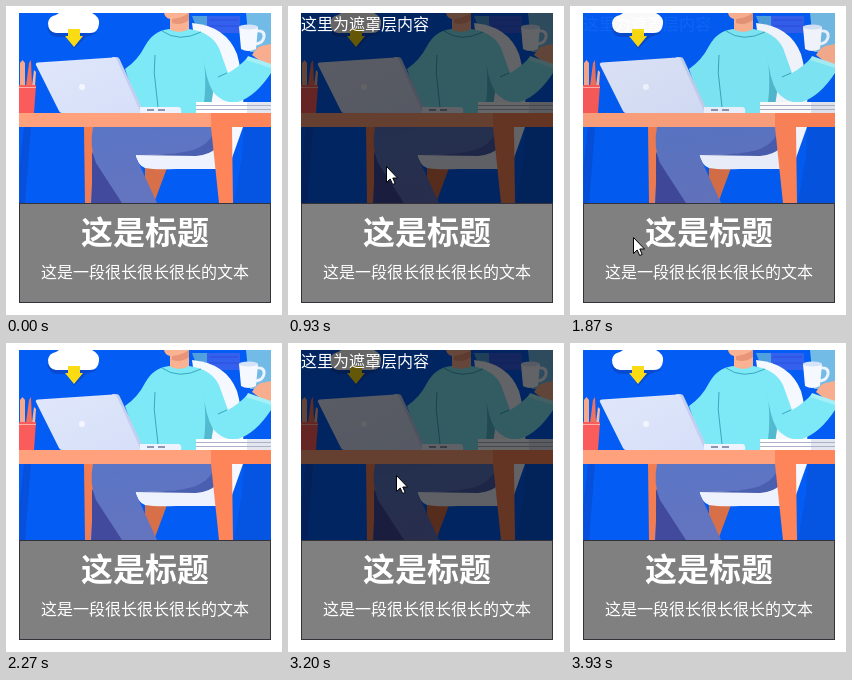
Recreate the animation shown at these times as an HTML page. Size 276 by 309 pixels, loop 4390 ms.

```html
<!DOCTYPE html>
<html lang="zh-CN">
<head>
<meta charset="utf-8">
<title>遮罩层</title>
<style>
  html, body { margin: 0; width: 100%; height: 100%; overflow: hidden; background: #fff; }
  svg { display: block; width: 100%; height: 100%; }
  text { font: 16px "Noto Sans CJK SC", "Noto Sans CJK", sans-serif; fill: #fff; }
  .title { font-size: 32px; font-weight: 700; }
  .caption text { text-anchor: middle; }
</style>
</head>
<body>
<svg viewBox="0 0 276 309">
  <defs>
    <clipPath id="frame"><rect x="13" y="7" width="252" height="190"/></clipPath>
    <linearGradient id="lid" x2="1" y2="1">
      <stop stop-color="#e0e7fb"/><stop offset="1" stop-color="#d6dff8"/>
    </linearGradient>
    <linearGradient id="trouser" x2=".3" y2="1">
      <stop stop-color="#5a76c6"/><stop offset="1" stop-color="#6474bf"/>
    </linearGradient>
  </defs>

  <g clip-path="url(#frame)">
    <rect x="13" y="7" width="252" height="190" fill="#035df4"/>

    <!-- wall -->
    <path d="M186 10H203V36H196Z" fill="#4fa0dc"/>
    <path d="M201 10H234V27H201Z" fill="#3460ee"/>
    <path d="M203 14H232M203 20H232" stroke="#2a4fdc"/>
    <path d="M240 7H265V46H244Z" fill="#72bbe6"/>
    <path d="M18 121H25L19 197H13V165Z" fill="#0750dc"/>
    <path d="M239 96H265V197H228L236 150Z" fill="#0655e2"/>

    <!-- cloud and arrow -->
    <path d="M41 21Q43 31 52 31H61L68 43 80 31 92 27Z" fill="#084bd0"/>
    <path d="M50 27Q42 26 42 17 43 10 50 9L53 7H86Q94 11 93 18 92 27 84 27Z" fill="#fff"/>
    <path d="M62 23H74V30H77L68 41 59 30H62Z" fill="#fbdc12"/>

    <!-- chair and legs -->
    <path d="M186 17Q220 20 231 48 239 76 237 121L226 152H205Z" fill="#f6f8ff"/>
    <path d="M139 162H161L148 197H139Z" fill="#d76f49"/>
    <path d="M129 147Q131 159 139 162 150 164 170 163H211V144Z" fill="#eef2fe"/>
    <path d="M78 121H89L85 197H79Z" fill="#f27d53"/>
    <path d="M86 146L117 197H86Z" fill="#414a9c"/>
    <path d="M87 121H211Q211 139 190 145 170 149 129 149L151 197H116L90 157Q83 140 87 121Z" fill="url(#trouser)"/>
    <path d="M129 149Q178 149 192 142 202 137 206 130V121H211V141Q204 149 190 150Z" fill="#4a5fb0"/>
    <path d="M205 121H226L227 197H213Z" fill="#fe845a"/>

    <!-- person -->
    <path d="M158 7H183V24L190 27H160L164 23V13Q159 12 158 7Z" fill="#fbb292"/>
    <path d="M166 13Q176 12 183 7V14Q175 20 166 17Z" fill="#e99577"/>
    <path d="M163 23Q173 29 183 23 205 26 213 42L222 67Q233 61 242 51L265 59V67Q250 90 232 96 217 98 207 86L204 107H134L119 63Q132 54 139 40 147 25 163 23Z" fill="#7de8f6"/>
    <path d="M197 46Q199 72 207 86L204 107H196Q202 82 197 46Z" fill="#52b9cf"/>
    <path d="M149 49Q147 67 150 83L152 101M221 67L212 71M156 25Q173 37 195 26" fill="none" stroke="#3aa7bd"/>

    <!-- cup and hand -->
    <path d="M250 25Q259 24 258 31 257 37 250 38" fill="none" stroke="#edf3ff" stroke-width="3"/>
    <path d="M246 49Q250 42 255 40L265 38V59L258 58Z" fill="#f7ad8e"/>
    <path d="M233 21H252L250 43Q242 47 235 43Z" fill="#f5f8ff"/>
    <ellipse cx="242.5" cy="21" rx="9.5" ry="2.5" fill="#d7e3fb"/>
    <path d="M242 50L265 58V62L240 54Z" fill="#a5f0f8"/>

    <!-- pencils -->
    <path d="M14 80V57L16.500 54 19 57V80" fill="#f7a98c"/>
    <path d="M20 80L23 57 25 54 26 80" fill="#f0725c"/>
    <path d="M26 80L28 64 30 66 29 80" fill="#f8b69c"/>
    <path d="M13 79H30L28 107H13Z" fill="#fa5c5b"/>
    <path d="M13 81.500H30" stroke="#ffb0a6"/>

    <!-- laptop -->
    <path d="M106 51H110Q113 51 114 54L137 104V107H132Z" fill="#c3cff0"/>
    <path d="M30 59Q29 57 32 56.500L107 51.500Q110 51 111 54L135 107H56Q54 107 53 105Z" fill="url(#lid)"/>
    <circle cx="76" cy="81" r="3" fill="#f3f6ff"/>
    <path d="M134 101H173Q176 102 175 107H134Z" fill="#eff3ff"/>
    <path d="M141 104H148M152 104H159" stroke="#8c96ae" stroke-width="2"/>

    <!-- books -->
    <path d="M190 96H265V107H190Z" fill="#fff"/>
    <path d="M241 96H265V107H241Z" fill="#e3e6ee"/>
    <path d="M190 99.500H265M190 103.500H265" stroke="#a9b2c8"/>

    <!-- desk -->
    <path d="M13 107H205V121H13Z" fill="#fea17c"/>
    <path d="M205 107H265V121H205Z" fill="#fe845a"/>
  </g>

  <g class="caption">
    <rect x="13.5" y="197.5" width="251" height="99" fill="#808080" stroke="#35323a"/>
    <text class="title" x="139" y="238">这是标题</text>
    <text x="139" y="272">这是一段很长很长很长的文本</text>
  </g>

  <g id="mask" opacity="0">
    <rect x="13" y="7" width="252" height="190" fill-opacity=".6"/>
    <text x="13" y="24">这里为遮罩层内容</text>
  </g>

  <g id="cursor" visibility="hidden">
    <path id="arrow" d="M.5 .5V16.5L4.2 13 6.7 18.5 9.2 17.4 6.8 12H11.5Z" fill="#fff" stroke="#000"/>
    <g id="beam" fill="none">
      <path d="M-3 -7.5H-1L0 -7 1 -7.5H3M0 -7V7M-3 7.5H-1L0 7 1 7.5H3" stroke="#fff" stroke-width="2.4"/>
      <path d="M-3 -7.5H-1L0 -7 1 -7.5H3M0 -7V7M-3 7.5H-1L0 7 1 7.5H3" stroke="#000"/>
    </g>
  </g>
</svg>

<script>
const LOOP = 4390, TICK = 200 / 3, FADE = 300;
const [mask, cursor, arrow, beam] =
  ['mask', 'cursor', 'arrow', 'beam'].map(id => document.getElementById(id));

// Each visit: [tick, x, y] stops, visible until its end tick.
const visits = [
  { end: 34, path: [[7, 45, 248], [9, 76, 197], [10, 84, 183], [14, 98, 160], [22, 98, 160],
                    [23, 72, 202], [24, 72, 202], [30, 59, 245], [32, 59, 245], [33, 43, 255]] },
  { end: 59, path: [[41, 50, 247], [43, 77, 195], [45, 91, 154], [48, 108, 132], [50, 108, 132],
                    [54, 84, 201], [55, 81, 228], [58, 72, 291]] }
];

// CSS "ease" curve, solved by bisection.
function ease(x) {
  if (x <= 0) return 0;
  if (x >= 1) return 1;
  const bezier = (s, a, b) => 3 * s * (1 - s) ** 2 * a + 3 * s * s * (1 - s) * b + s ** 3;
  let low = 0, high = 1;
  for (let i = 0; i < 24; i++) {
    const mid = (low + high) / 2;
    if (bezier(mid, .25, .25) < x) low = mid; else high = mid;
  }
  return bezier(low, .1, 1);
}

function maskLevel(time) {
  const fade = start => ease((time - start) / FADE);
  return fade(600) - fade(1640) + fade(2895) - fade(3630);
}

function cursorAt(tick) {
  const visit = visits.find(v => tick >= v.path[0][0] && tick < v.end);
  if (!visit) return null;
  const next = visit.path.findIndex(stop => stop[0] >= tick);
  if (next === 0) return visit.path[0].slice(1);
  const [t0, x0, y0] = visit.path[next - 1], [t1, x1, y1] = visit.path[next];
  const k = (tick - t0) / (t1 - t0);
  return [Math.round(x0 + (x1 - x0) * k), Math.round(y0 + (y1 - y0) * k)];
}

function overText([x, y]) {
  const inside = (left, right, top, bottom) => x > left && x < right && y > top && y < bottom;
  return inside(75, 203, 207, 247) || inside(35, 243, 257, 275);
}

function draw(now) {
  const tick = Math.floor((now % LOOP + 4) / TICK);
  mask.setAttribute('opacity', maskLevel(tick * TICK).toFixed(3));
  const spot = cursorAt(tick);
  cursor.setAttribute('visibility', spot ? 'visible' : 'hidden');
  if (spot) {
    const text = overText(spot);
    cursor.setAttribute('transform', `translate(${spot})`);
    arrow.style.display = text ? 'none' : '';
    beam.style.display = text ? '' : 'none';
  }
}

const start = performance.now();
function frame() {
  draw(performance.now() - start);
  requestAnimationFrame(frame);
}
frame();
</script>
</body>
</html>
```
